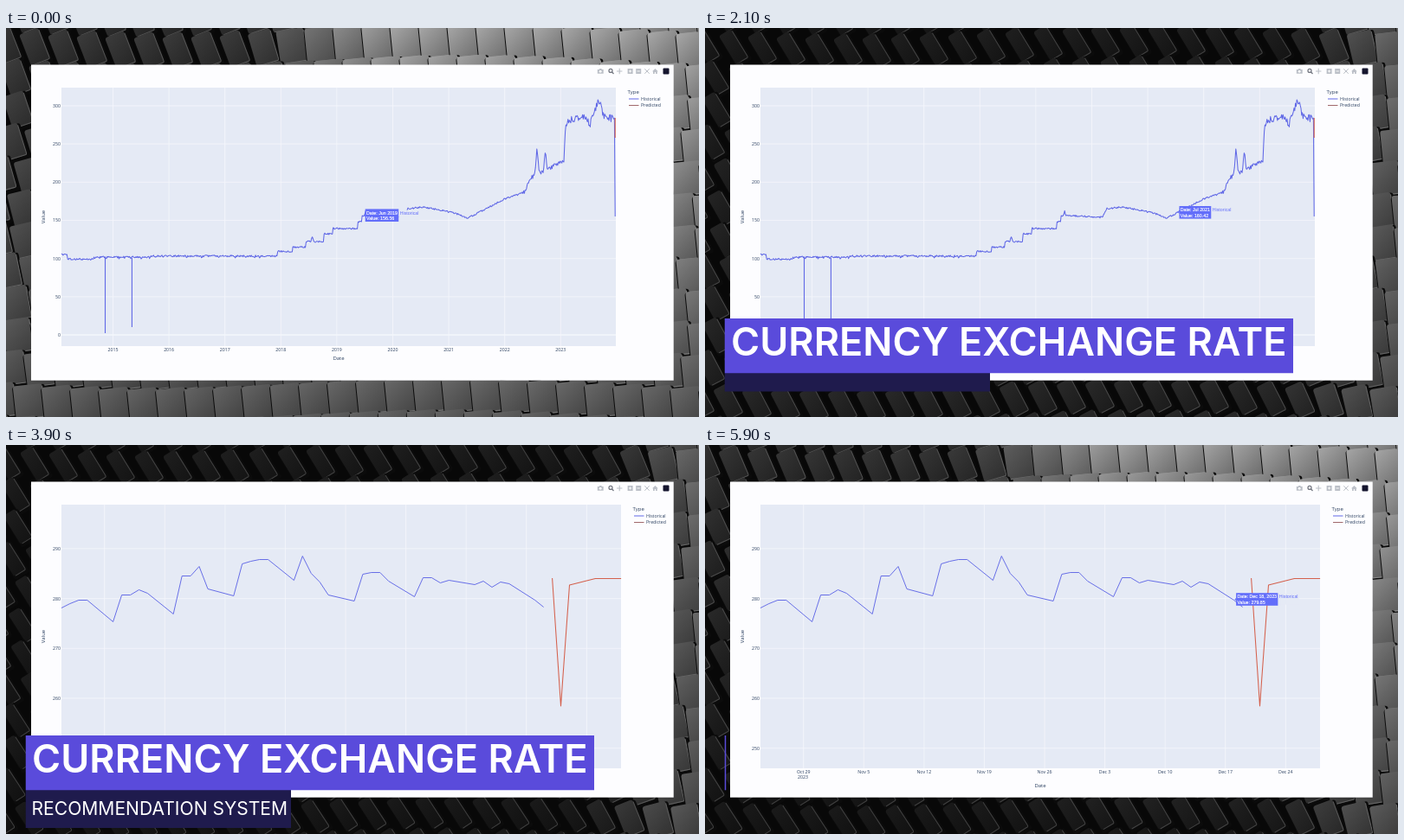
An HTML page with a canvas that plays this animation: 800x450 px, repeating every 6000 ms.

```html
<!DOCTYPE html>
<html lang="en">
<head>
<meta charset="utf-8">
<title>Currency exchange rate</title>
<style>
html, body { margin: 0; width: 100%; height: 100%; overflow: hidden; background: #080808; }
canvas, #stage { position: absolute; left: 0; top: 0; width: 800px; height: 450px; display: block; }
text { white-space: pre; }
.ui { font-family: "Open Sans", sans-serif; fill: #2a3f5f; }
.tip { font-family: "Liberation Sans", Arial, sans-serif; font-size: 5.3px; }
.head { font-family: Inter, sans-serif; fill: #fff; }
</style>
</head>
<body>
<canvas id="tiles" width="800" height="450"></canvas>
<svg id="stage" viewBox="0 0 800 450" xmlns="http://www.w3.org/2000/svg"></svg>
<script>
const LOOP = 6000, STEP = 100, SWITCH = 3900;
const BLUE = '#6068e6', RED = '#d4604c', PLOT = '#e5eaf5', GRID = '#f5f7fc';
const $ = id => document.getElementById(id);
const clamp = (v, a = 0, b = 1) => Math.min(b, Math.max(a, v));
const lerp = (a, b, u) => a + (b - a) * u;
const prog = (t, start, dur) => clamp((t - start) / dur);
const easeOut = u => 1 - (1 - u) * (1 - u);
const smooth = u => u * u * (3 - 2 * u);
const range = (n, fn) => Array.from({ length: n }, (_, i) => fn(i));

function seeded(s) {
  return () => {
    s = (s * 1664525 + 1013904223) >>> 0;
    return s / 4294967296;
  };
}

// ---------- background tiles ----------
const ctx = $('tiles').getContext('2d');

// light leaves the top to the right and comes back; the bottom glow fades out
function brightness(x, y, t) {
  const swing = Math.sin(Math.PI * t / LOOP);
  const edge = 250 + 460 * swing;
  const glow = Math.exp(-((t / 1700) ** 2));
  const top = 24 + 25 * (1 - swing) + 100 * smooth(prog(x, edge, 220));
  const bottom = 22 + 66 * glow + 55 * (1 - glow) * smooth(prog(x, 640, 160));
  return lerp(top, bottom, clamp(y / 450));
}

const gray = v => { const c = Math.round(clamp(v, 0, 200)); return `rgb(${c},${c},${c})`; };

// dim tiles are turned edge-on, bright ones face the viewer
function tile(x, y, b) {
  const open = clamp(0.24 + b / 115, 0.3, 1);
  const w = 34 * open, h = 39;
  ctx.save();
  ctx.translate(x, y);
  ctx.rotate(-0.1 - 0.85 * (1 - open));
  ctx.fillStyle = '#0b0b0b';
  ctx.beginPath();
  ctx.roundRect(-w / 2 - 1, -h / 2 + 1, w + 4, h + 3, 3);
  ctx.fill();
  const g = ctx.createLinearGradient(-w / 2, -h / 2, w / 2, h / 2);
  g.addColorStop(0, gray(b * 1.15));
  g.addColorStop(1, gray(b * 0.75));
  ctx.fillStyle = g;
  ctx.beginPath();
  ctx.roundRect(-w / 2, -h / 2, w, h, 3);
  ctx.fill();
  ctx.strokeStyle = gray(b * 0.75 + 45);
  ctx.lineWidth = 1.1;
  ctx.beginPath();
  ctx.moveTo(-w / 2 + 2, h / 2 - 0.5);
  ctx.lineTo(w / 2 - 2, h / 2 - 0.5);
  ctx.quadraticCurveTo(w / 2, h / 2, w / 2, h / 2 - 3);
  ctx.lineTo(w / 2, -h / 2 + 3);
  ctx.stroke();
  ctx.restore();
}

function drawTiles(t) {
  ctx.fillStyle = '#080808';
  ctx.fillRect(0, 0, 800, 450);
  for (let j = -1; j < 13; j++) {
    for (let i = -1; i < 26; i++) {
      const x = i * 33 + 14 * Math.sin(j * 0.9);
      const y = 20 + j * 37.3 + 6 * Math.sin(i * 0.3);
      if (x > 58 && x < 742 && y > 72 && y < 378) continue;
      tile(x, y, brightness(x, y, t));
    }
  }
}

// ---------- chart data, in stage pixels ----------
const stairs = [[64, 262], [71, 267.5], [101, 265], [167, 263.699], [313, 258.5], [331, 253.5],
  [346, 247], [367, 238], [377, 232], [406, 224], [411, 217]];
const slope = [[413, 216.705], [459, 219], [464, 209], [482, 207], [518, 214], [533, 220], [575, 198],
  [598, 190], [606, 173], [628, 162], [644, 153], [646, 113], [653, 104], [703, 104]];
// x, height, width
const bumps = [[353.5, 6, 1], [415.2, 5, 0.7], [613, 28, 1.6], [622.5, 21.91, 1.3], [684, 20, 4], [674, -9, 1.7]];

function trendY(x) {
  let y;
  if (x < 413) {
    y = stairs.findLast(p => p[0] <= x)[1];
  } else {
    const i = clamp(slope.findIndex(p => p[0] > x), 1, slope.length - 1);
    const [a, b] = [slope[i - 1], slope[i]];
    y = lerp(a[1], b[1], prog(x, a[0], b[0] - a[0]));
  }
  return bumps.reduce((v, [c, h, w]) => v - h * Math.exp(-(((x - c) / w) ** 2)), y);
}

function noisyTrend() {
  const rnd = seeded(11);
  return range(800, i => {
    const x = 64 + i * 0.8;
    const amp = x > 648 ? 9 : x > 595 ? 4.5 : 1.9;
    const dip = x < 312 && rnd() > 0.9 ? 1.3 : 0;
    return [x, trendY(x) + (rnd() - 0.5) * amp + dip];
  });
}

// one height per trading day, Tuesday first, weekends skipped
const daily = [188, 183, 179, 179, 204, 173, 173, 167, 171, 195, 151, 151, 140, 166, 174, 137, 134, 132, 132,
  156, 128, 148, 158, 173, 180, 149, 147, 147, 157, 175, 153, 153, 159, 156, 161, 157, 164, 158, 160, 179, 187];
const dayX = d => 64 + d * 9.94;
const recent = daily.map((y, i) => [dayX(i + 2 * Math.floor((i + 1) / 5)), y + 0.5]);
const forecast = [[57, 154], [58, 302], [59, 162], [62, 154.5], [65, 154.5]].map(([d, y]) => [dayX(d), y]);

const toPath = pts => 'M' + pts.map(p => p[0].toFixed(1) + ' ' + p[1].toFixed(1)).join('L');

// ---------- markup ----------
const label = (x, y, s, anchor = 'middle', size = 5.2) =>
  `<text class="ui" x="${x}" y="${y}" font-size="${size}" text-anchor="${anchor}">${s}</text>`;
const curve = (d, c, w = 1.05) =>
  `<path d="${d}" stroke="${c}" stroke-width="${w}" fill="none" stroke-linejoin="round"/>`;
const line = (x1, y1, x2, y2, c = GRID, w = 0.8) => curve(`M${x1} ${y1}L${x2} ${y2}`, c, w);

function frame({ right, bottom, xs, ys, gap }) {
  let s = `<rect x="64" y="69" width="${right - 64}" height="${bottom - 69}" fill="${PLOT}"/>`;
  xs.forEach(([x, name]) => { s += line(x, 69, x, bottom) + label(x, bottom + 5.5, name); });
  ys.forEach(([y, name]) => {
    s += line(64, y, right, y, GRID, name === 0 ? 1.4 : 0.8) + label(63, y + 1.9, name, 'end');
  });
  s += label((64 + right) / 2, bottom + gap, 'Date', 'middle', 6);
  s += `<g transform="translate(45 ${(69 + bottom) / 2}) rotate(-90)">${label(0, 0, 'Value', 'middle', 6)}</g>`;
  const lx = right + 13.5;
  s += label(lx, 76, 'Type', 'start', 6);
  [['Historical', BLUE], ['Predicted', '#a0686c']].forEach(([name, c], i) => {
    const y = 82 + i * 7.5;
    s += line(lx + 1.5, y, lx + 13, y, c, 1) + label(lx + 15.5, y + 1.8, name, 'start');
  });
  return s;
}

const years = range(9, i => [123.5 + i * 64.6, 2015 + i]);
const weeks = ['Oct 29', 'Nov 5', 'Nov 12', 'Nov 19', 'Nov 26', 'Dec 3', 'Dec 10', 'Dec 17', 'Dec 24']
  .map((s, i) => [dayX(5 + i * 7), s]);
const hundreds = range(7, i => [355 - i * 44.17, i * 50]);
const tens = range(5, i => [350.7 - i * 57.7, 250 + i * 10]);

const longChart = frame({ right: 704, bottom: 368, xs: years, ys: hundreds, gap: 16 })
  + curve(toPath(noisyTrend()), BLUE)
  + line(114.5, 266, 114.5, 353, BLUE, 1.1) + line(145.4, 266, 145.4, 346, BLUE, 1.1)
  + line(703.2, 104, 703.2, 127, RED, 1.1);
const shortChart = frame({ right: 710, bottom: 374, xs: weeks, ys: tens, gap: 22 })
  + label(113, 385.8, '2023')
  + curve(toPath(recent), BLUE, 0.95) + curve(toPath(forecast), RED);

const toolbar = `
  <g fill="#bcc0c8">
    <path d="M682.8 48h1.8l.7-1.1h2l.7 1.1h1.7v4.8h-6.9z"/>
    <circle cx="686.2" cy="50.3" r="1.4" fill="#fff"/>
    <rect x="717.6" y="47" width="6" height="6"/>
    <rect x="727.2" y="47" width="6" height="6"/>
    <path d="M746 50.2l3.4-3.2 3.4 3.2h-1v2.8h-1.8v-2h-1.2v2h-1.8v-2.8z"/>
  </g>
  <g fill="none" stroke="#bcc0c8">
    <path d="M705 50h6.4M708.2 46.8v6.4" stroke-width="1.1"/>
    <path d="M719 50h3.2M720.6 48.4v3.2M728.6 50h3.2" stroke="#fff" stroke-width=".9"/>
    <path d="M737.3 47.2l5.4 5.6M742.7 47.2l-5.4 5.6"/>
  </g>
  <g fill="none" stroke="#70747e" stroke-width="1.2">
    <circle cx="698" cy="49.4" r="2"/>
    <path d="M699.5 51l2 2"/>
  </g>
  <rect x="758.5" y="46.5" width="7" height="7" rx="1" fill="#15152e"/>`;

$('stage').innerHTML = `
  <rect x="29" y="42.5" width="741.7" height="365.2" fill="#fdfdff"/>
  <g id="long">${longChart}</g>
  <g id="short">${shortChart}</g>
  <g id="toolbar">${toolbar}</g>
  <g id="tip">
    <rect id="tipBack" fill="${PLOT}" height="12"/>
    <rect id="tipBox" height="14.6"/>
    <path id="tipArrow"/>
    <text id="tipDate" class="tip"></text>
    <text id="tipValue" class="tip"></text>
    <text id="tipName" class="tip"></text>
  </g>
  <svg id="sub" x="22.5" y="399" width="306.5" height="44">
    <rect width="306.5" height="44" fill="#1f1b4d"/>
    <text id="subText" class="head" x="7" font-size="21.1">RECOMMENDATION SYSTEM</text>
  </svg>
  <svg id="title" x="22.5" y="336" width="656.5" height="63.5">
    <rect width="656.5" height="63.5" fill="#5a4bdb"/>
    <text id="titleText" class="head" y="42.5" font-size="45" font-weight="600">CURRENCY EXCHANGE RATE</text>
  </svg>`;

function set(id, attrs) {
  for (const k in attrs) $(id).setAttribute(k, attrs[k]);
}
const show = (id, on) => set(id, { display: on ? 'inline' : 'none' });

// ---------- hover label ----------
const months = 'Jan Feb Mar Apr May Jun Jul Aug Sep Oct Nov Dec'.split(' ');

function trendTip(x) {
  const y = trendY(x), at = 2015 + (x - 123.5) / 64.6, year = Math.floor(at);
  const value = (355 - y) * 300 / 265;
  return { x, y, date: `${months[Math.floor((at - year) * 12)]} ${year}`, value: value.toFixed(2), name: 'Historical' };
}

function hover(t) {
  if (t < 1400) return trendTip(413 - 171.2 * t / 800);
  if (t >= 2100 && t < 3100) return trendTip(620.8 + (t - 2600) * 0.15);
  if (t >= 4300 && t < 5200) return { x: 630.5, y: 154.5, date: 'Dec 20, 2023', value: '283.98', name: 'Predicted' };
  if (t >= 5200) return { x: 611.4, y: 178.5, date: 'Dec 18, 2023', value: '279.85', name: 'Historical' };
  return null;
}

function drawTip(t) {
  const h = hover(t);
  show('tip', h);
  if (!h) return;
  const red = h.name === 'Predicted', c = red ? '#ef553b' : '#636efa', ink = red ? '#5a2a2a' : '#fff';
  const x = h.x + 1.7, y = h.y - 7.3;
  $('tipDate').textContent = 'Date: ' + h.date;
  $('tipValue').textContent = 'Value: ' + h.value;
  $('tipName').textContent = h.name;
  const w = $('tipDate').getComputedTextLength() + 2.6;
  set('tipBox', { x, y, width: w, fill: c, stroke: red ? ink : 'none', 'stroke-width': 0.4 });
  set('tipArrow', { d: `M${h.x} ${h.y}l1.9 -1.7v3.4z`, fill: c });
  const text = { x: x + 1.3, fill: ink, stroke: ink, 'stroke-width': 0.15 };
  set('tipDate', { ...text, y: y + 6.1 });
  set('tipValue', { ...text, y: y + 12.7 });
  set('tipName', { x: x + w + 1.4, y: y + 6.2, fill: c });
  set('tipBack', { x: x + w, y: y + 1.3, width: $('tipName').getComputedTextLength() + 2.5 });
}

// ---------- banners ----------
function drawBanners(t) {
  const entering = t < 3000;
  const out = prog(t, 5150, 751);
  const wide = 656.5 * (entering ? easeOut(prog(t, 1200, 780)) : 1 - out * out);
  show('title', wide > 0);
  set('title', { width: wide });
  set('titleText', { x: 7.5 + (656.5 - wide) / 2 });

  const leave = prog(t, 4350, 350);
  const tall = 44 * (entering ? easeOut(prog(t, 2000, 350)) : 1 - leave * leave);
  const hide = entering ? 1 - easeOut(prog(t, 2150, 350)) : prog(t, 4200, 280);
  show('sub', tall > 0);
  set('sub', { height: tall });
  set('subText', { y: 28.5 + hide * 36 });
}

function render(t) {
  drawTiles(t);
  show('long', t < SWITCH);
  show('short', t >= SWITCH);
  set('toolbar', { opacity: t >= 3300 && t < SWITCH ? 0.6 : 1 });
  drawTip(t);
  drawBanners(t);
}

const start = performance.now();
let last = -1;
function tick() {
  const now = Math.max(0, performance.now() - start) % LOOP;
  const t = Math.floor(now / STEP) * STEP;
  if (t !== last) render(last = t);
  requestAnimationFrame(tick);
}
tick();
</script>
</body>
</html>
```
